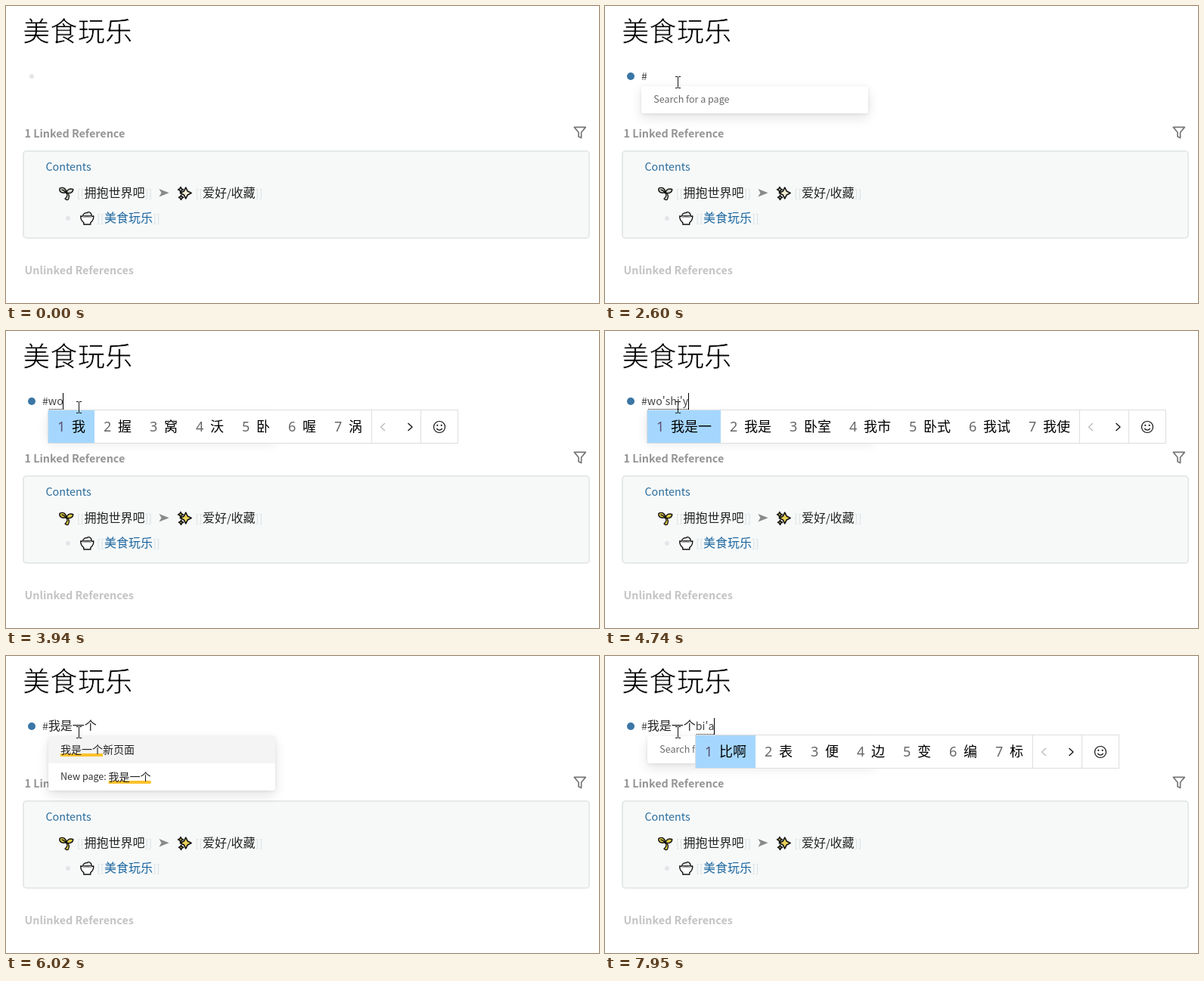
These frames come from a looping animation (784x393 px, 8 s). An HTML page with a canvas:

```html
<!DOCTYPE html>
<html lang="zh">
<head>
<meta charset="utf-8">
<title>Notes editor</title>
<style>
html, body { margin: 0; width: 100%; height: 100%; overflow: hidden; background: #fff; }
canvas { display: block; width: 784px; height: 393px; }
</style>
</head>
<body>
<canvas id="stage"></canvas>
<script>
const LOOP = 8000, W = 784, H = 393;
const CJK = '"Noto Sans CJK SC", "Noto Sans CJK JP", "Noto Sans CJK", sans-serif';
const DIGITS = '"Noto Sans", "Open Sans", sans-serif';
const LATIN = 14.32, TYPED = 14.15;
const INK = '#222', LINK = '#2a6c9c', BULLET = '#e3e6e8';

const canvas = document.getElementById('stage');
const dpr = window.devicePixelRatio || 1;
canvas.width = W * dpr;
canvas.height = H * dpr;
const c = canvas.getContext('2d');

function text(s, x, y, size, color, weight = 400, family = CJK) {
  c.font = `${weight} ${size}px ${family}`;
  c.fillStyle = color;
  c.fillText(s, x, y);
  return x + c.measureText(s).width;
}

function rect(x, y, w, h, color) {
  c.fillStyle = color;
  c.fillRect(x, y, w, h);
}

function dot(x, y, r, color) {
  c.fillStyle = color;
  c.beginPath();
  c.arc(x, y, r, 0, Math.PI * 2);
  c.fill();
}

function path(d, fill, stroke, width = 1) {
  const p = new Path2D(d);
  if (fill) { c.fillStyle = fill; c.fill(p); }
  if (stroke) { c.strokeStyle = stroke; c.lineWidth = width; c.stroke(p); }
}

function at(x, y, draw) {
  c.save();
  c.translate(x, y);
  draw();
  c.restore();
}

// Does the system have a real light cut of the heading face?
function sample(weight) {
  const s = document.createElement('canvas');
  s.width = s.height = 40;
  const g = s.getContext('2d');
  g.font = `${weight} 36px ${CJK}`;
  g.fillText('美', 2, 34);
  return s.toDataURL();
}
const hasLight = sample(300) !== sample(400);

function heading() {
  text('美食玩乐', 22, 46.8, 36.35, '#000', 300);
  if (hasLight) return;
  c.strokeStyle = '#fff';
  c.lineWidth = 0.75;
  c.strokeText('美食玩乐', 22, 46.8);
}

function sprout(warm) {
  const leaf = warm ? '#ddcb45' : '#d3d6cd';
  path('M9 9 C12 11 11.5 14 8 17 Q10 19.3 12.4 18 C14.2 14 13.4 11 11 9 Z', leaf, '#111', 1.3);
  path('M10 8.6 C11 4.5 15 3 18.8 4.6 C18.4 9 14 11 10 8.6 Z', leaf, '#111', 1.4);
  path('M1 3.4 C0 8.2 4 10 9.6 8.8 C9.8 4.4 6 .6 1 3.4 Z M3.5 5 Q6.5 5.5 9 8.5', leaf, '#111', 1.4);
}

function star(x, y, r, fill) {
  const q = r * 0.33;
  at(x, y, () => path(
    `M0 ${-r} L${q} ${-q} L${r} 0 L${q} ${q} L0 ${r} L${-q} ${q} L${-r} 0 L${-q} ${-q} Z`,
    fill, '#111', 1.6));
}

function sparkles(warm) {
  const fill = warm ? '#e8d257' : '#f4efd5';
  star(4.4, 4.4, 3.4, fill);
  star(5, 14.8, 3, fill);
  star(11.2, 9, 7.4, fill);
}

function bowl() {
  path('M3.6 7 C4 4 7 2.2 9.5 2.6 C11 .6 15.4 1.6 15.4 7 Z', '#e2e2e2', '#111', 1.3);
  path('M.9 7 Q9.5 8.8 18 7 C18 11 16.6 13.8 14 15.6 V18 H5 V15.6 C2.4 13.8 .9 11 .9 7 Z', '#fff', '#111', 1.4);
  path('M3.5 7.4 Q9.5 9 15.5 7.4', null, '#aaa', 1.5);
}

function bracketed(x, y, color, ...parts) {
  const gray = '#dadfe2';
  x = text('[[', x, y, LATIN, gray);
  for (const s of parts) x = text(s, x, y, s === '/' ? LATIN : 16, color);
  text(']]', x, y, LATIN, gray);
}

function page(warm) {
  rect(0, 0, W, H, '#fff');
  heading();
  text('1 Linked Reference', 24.5, 174, LATIN, '#959595', 700);
  path('M751.3 160.4 H766.3 L760.6 167.2 V174.6 L757 172.8 V167.2 Z', null, '#777', 1.7);

  c.beginPath();
  c.roundRect(23, 192, 748, 115, 4);
  c.fillStyle = '#f7f9f9';
  c.fill();
  c.strokeStyle = '#e6e9ea';
  c.lineWidth = 2;
  c.stroke();

  text('Contents', 52.4, 218, LATIN, LINK);
  at(70, 238, () => sprout(warm));
  bracketed(93.7, 253, INK, '拥抱世界吧');
  path('M202.4 242 L215.6 247.2 L202.4 252.4 L205.4 247.2 Z', '#8a8a8a');
  at(226.5, 238.5, () => sparkles(warm));
  bracketed(250.3, 253, INK, '爱好', '/', '收藏');
  dot(82, 281, 3, BULLET);
  at(97.8, 271, bowl);
  bracketed(120.2, 286, '#1c669f', '美食玩乐');
  text('Unlinked References', 24.5, 355, LATIN, '#c4c4c4', 700);
}

function panel(x, h, alpha = 1) {
  c.save();
  c.globalAlpha = alpha;
  for (const [color, blur, dy] of [['rgba(16,22,26,.11)', 16, 6], ['rgba(16,22,26,.08)', 4, 1]]) {
    c.shadowColor = color;
    c.shadowBlur = blur * dpr;
    c.shadowOffsetY = dy * dpr;
    c.beginPath();
    c.roundRect(x, 106, 300, h, 3);
    c.fillStyle = '#fff';
    c.fill();
  }
  c.restore();
}

function searchPanel(x, alpha = 1) {
  panel(x, 36, alpha);
  c.globalAlpha = alpha;
  text('Search for a page', x + 16.3, 128, 12.53, '#6b6b6b');
  c.globalAlpha = 1;
}

function resultPanel(x) {
  panel(x, 72);
  c.beginPath();
  c.roundRect(x, 106, 300, 36, [3, 3, 0, 0]);
  c.fillStyle = '#f4f4f4';
  c.fill();
  const left = x + 16;
  rect(left, 129, 56, 4, '#fbc22d');
  text('我是一个新页面', left, 129, 14, INK);
  const next = text('New page: ', left, 164, 12.53, '#333');
  rect(next, 165, 56, 4, '#fbc22d');
  text('我是一个', next, 165, 14, INK);
}

function picker(x, words) {
  const widths = words.map(w => 43 + 18 * w.length);
  const end = x + widths.reduce((a, b) => a + b, 0);
  rect(x - 1, 104, end - x + 116, 45, '#dedede');
  rect(x, 105, end - x + 114, 43, '#fff');
  rect(x, 105, widths[0], 43, '#a5d7fe');
  let left = x;
  words.forEach((word, i) => {
    text(String(i + 1), left + 12, 133, 18, i ? '#666' : '#5a4f73', 400, DIGITS);
    text(word, left + 31, 133.2, 18, '#000');
    left += widths[i];
  });
  rect(end, 105, 1, 43, '#dedede');
  rect(end + 65, 105, 1, 43, '#dedede');
  path(`M${end + 18} 122 l-5.5 5 l5.5 5`, null, '#b8b8b8', 1.2);
  path(`M${end + 48.5} 122 l5.5 5 l-5.5 5`, null, '#111', 1.3);
  at(end + 90, 127, () => {
    path('M7.5 0 A7.5 7.5 0 1 1 -7.5 0 A7.5 7.5 0 1 1 7.5 0 M-3.8 2 Q0 6.4 3.8 2', null, '#111', 1.2);
    dot(-2.7, -2.2, 1.1, '#111');
    dot(2.7, -2.2, 1.1, '#111');
  });
}

function caret(x) {
  rect(Math.floor(x), 82, 1, 22, '#000');
}

// Composition states: start time, typed letters, candidates
const COMPOSE = [
  [3810, 'w', '我 为 无 位 五 玩 问'],
  [3940, 'wo', '我 握 窝 沃 卧 喔 涡'],
  [4070, "wo's", '我是 我说 我所 我上 我手 我算 我随'],
  [4270, "wo'sh", '我是 我说 我上 我手 卧室 我少 我谁'],
  [4340, "wo'shi", '我是 卧室 我市 卧式 我试 我使 我时'],
  [4740, "wo'shi'y", '我是一 我是 卧室 我市 卧式 我试 我使'],
  [4840, "wo'shi'yi", '我是一 我十一 我是 卧室 我市 卧式 我试'],
  [4970, "wo'shi'yi'g", '我是一个 我十一 我是 卧室 我市 卧式 我试'],
  [5070, "wo'shi'yi'ge", '我是一个 我十一 我是 卧室 我市 卧式 我试'],
  [5470, '', ''],
  [7610, 'b', '不 吧 把 被 比 别 部'],
  [7810, 'bi', '比 必 笔 币 毕 闭 避'],
  [7950, "bi'a", '比啊 表 便 边 变 编 标']
];

// Spans in which the text caret shows while nothing is being composed
const CARET_ON = [[910, 1440], [1990, 2600], [3140, 3670], [5470, 6020], [6550, 7080]];

function pointer(t) {
  if (t < 80) return;
  const k = Math.min(1, Math.floor((t - 80) / 69) / 11);
  const left = (1 - k) ** 1.5;
  const x = 96 + 544 * left, y = 101 + 268 * left;
  if (k < 1) {
    at(x, y, () => path('M.5 .5 V15 L4 11.8 L6.4 17 L8.8 16 L6.5 11 H11 Z', '#fff', '#111', 1));
  } else {
    rect(96, 94, 1, 14, '#111');
    for (const row of [93, 108]) {
      rect(93, row, 3, 1, '#111');
      rect(97, row, 3, 1, '#111');
    }
  }
}

function editor(t) {
  const focused = t >= 910;
  dot(34, 93, focused ? 5 : 3, focused ? '#3a76a6' : BULLET);

  let x = 48;
  if (t >= 2060) x = text('#', x, 98, TYPED, '#444');
  if (t >= 5470) x = text('我是一个', x, 98.3, 16, INK);

  const state = COMPOSE.filter(s => s[0] <= t).pop();
  const letters = state ? state[1] : '';
  const start = x;
  if (letters) x = text(letters, x, 98, TYPED, '#444');

  if (t >= 5470 && t < 7610) resultPanel(56);
  else if (t >= 3810) searchPanel(56);
  else if (t >= 2060) searchPanel(48, Math.min(1, (t - 1990) / 280));

  if (letters) {
    for (let u = Math.round(start) + 1; u < x; u += 2) rect(u, 103, 1, 1, '#222');
    picker(Math.round(start), state[2].split(' '));
  }
  if (letters || CARET_ON.some(([a, b]) => t >= a && t < b)) caret(x);
}

function draw(t) {
  c.setTransform(dpr, 0, 0, dpr, 0, 0);
  c.lineJoin = 'round';
  page(t >= 3810);
  editor(t);
  pointer(t);
}

const begin = performance.now();
function tick() {
  draw((performance.now() - begin) % LOOP);
  requestAnimationFrame(tick);
}
tick();
</script>
</body>
</html>
```
